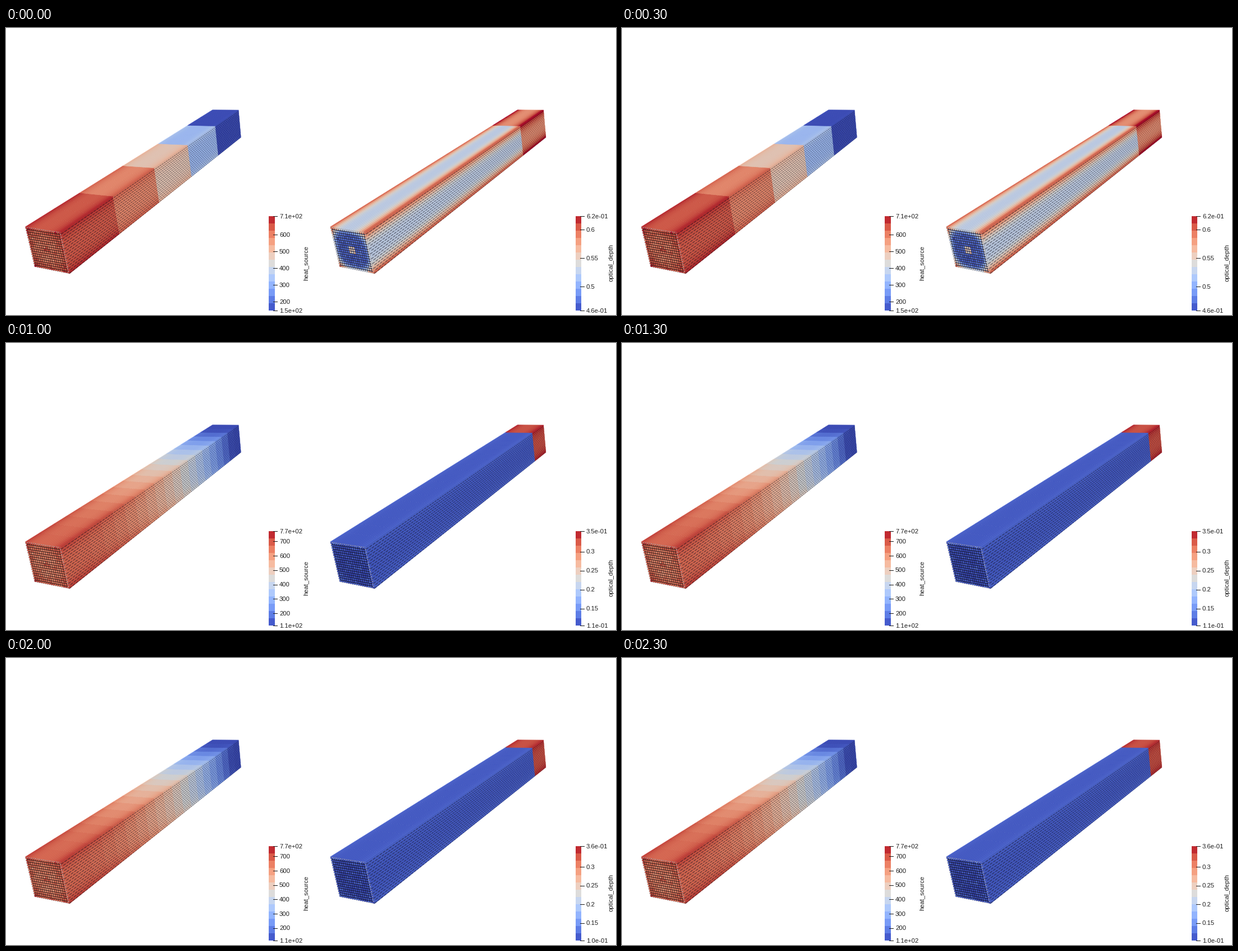
A matplotlib script for the animation above (2.5 s loop, 1089 px wide and 514 px high).

```python
import numpy as np
import matplotlib.pyplot as plt
from matplotlib.animation import FuncAnimation
from matplotlib.collections import PolyCollection

W, H, DPI = 1089, 514, 100
PINS, CELLS = 17, 20
SHIFT = 544.5
BAR_TOP, BAR_BOTTOM = 337, 506
INK = "#1c1c1c"
FONT = dict(family="Liberation Sans", fontsize=11.3 * 72 / DPI, color=INK)
CMAP = plt.get_cmap("coolwarm")

# (across, down, depth) -> stage position
ANCHORS = [
    ((0, 0, 0), (34, 356)), ((1, 0, 0), (98, 366)), ((0, 1, 0), (51, 428)),
    ((1, 1, 0), (113, 440)), ((0, 0, 1), (368, 147)), ((1, 0, 1), (415, 147)),
    ((1, 1, 1), (419, 196)), ((0, 0, .4), (209, 247)), ((1, 0, .4), (264, 251)),
    ((1, 1, .4), (273, 312)), ((0, 0, .8), (325, 174)), ((1, 0, .8), (374, 175)),
    ((1, 1, .8), (380, 228)),
]

# Per step: axial sections, heat range, heat peak, depth range, depth profile,
# depth profile of the far section, lift of the centre pins, tick values
STEPS = [
    dict(sections=5, heat=(147, 710), peak=717, depth=(.458, .6235),
         near=(.06, .09, .42, .85), far=(.76, 1.0), lift=.5,
         heat_ticks=range(200, 700, 100), depth_ticks=(.5, .55, .6)),
    dict(sections=10, heat=(110, 730), peak=730, depth=(.2206, .3517),
         near=(.03, .06, .27, .6), far=(.9, .95), lift=.38,
         heat_ticks=range(200, 700, 100),
         depth_ticks=(.24, .26, .28, .3, .32, .34)),
    dict(sections=20, heat=(114, 772), peak=742, depth=(.1054, .3538),
         near=(.02, .02, .04, .06), far=(.9, .97), lift=0,
         heat_ticks=range(200, 800, 100), depth_ticks=(.15, .2, .25, .3)),
    dict(sections=20, heat=(111, 771), peak=742, depth=(.1026, .3534),
         near=(.02, .03, .05, .07), far=(.91, .97), lift=0,
         heat_ticks=range(200, 800, 100), depth_ticks=(.15, .2, .25, .3)),
    dict(sections=20, heat=(113, 772), peak=742, depth=(.103, .356),
         near=(.02, .02, .04, .06), far=(.9, .96), lift=0,
         heat_ticks=range(200, 800, 100), depth_ticks=(.15, .2, .25, .3)),
]


def fit_camera(anchors):
    rows = []
    for point, (x, y) in anchors:
        p = np.array([*point, 1.0])
        rows.append(np.r_[p, np.zeros(4), -x / 500 * p])
        rows.append(np.r_[np.zeros(4), p, -y / 500 * p])
    camera = np.linalg.svd(np.array(rows))[2][-1].reshape(3, 4)
    camera[:2] *= 500
    return camera


CAMERA = fit_camera(ANCHORS)


def project(points):
    points = np.asarray(points, float)
    flat = np.concatenate([points, np.ones(points.shape[:-1] + (1,))], -1) @ CAMERA.T
    return flat[..., :2] / flat[..., 2:]


def face_quad(face, a0, a1, t0, t1):
    corners = [(a0, t0), (a1, t0), (a1, t1), (a0, t1)]
    if face == "top":
        return [(a, 0, t) for a, t in corners]
    return [(1, a, t) for a, t in corners]


def build_bundle():
    """Outer rod cells and front pin ends, with the sample point and light of each."""
    quads, samples, lights = [], [], []
    for face, light in (("top", .97), ("side", .9)):
        for t in range(CELLS):
            for i in range(PINS):
                mid, edge = (i + .5) / PINS, .5 / PINS
                quads.append(project(face_quad(face, i / PINS, (i + 1) / PINS,
                                               t / CELLS, (t + 1) / CELLS)))
                where = (mid, edge) if face == "top" else (1 - edge, mid)
                samples.append((*where, (t + .5) / CELLS))
                lights.append(light)
    ends = []
    angles = np.linspace(0, 2 * np.pi, 12, endpoint=False)
    for j in range(PINS):
        for i in range(PINS):
            u, v = (i + .5) / PINS, (j + .5) / PINS
            ring = [(u + .5 / PINS * np.cos(a), v + .43 / PINS * np.sin(a), 0)
                    for a in angles]
            ends.append(project(ring))
            samples.append((u, v, 0.0))
            lights.append(.95)
    return quads, ends, np.array(samples), np.array(lights)


def build_gaps():
    """Dark gaps between neighbouring rods; the side ones are broken into beads."""
    side, top = [], []
    beads = 84
    for i in range(PINS):
        for k in range(beads):
            t = (k + .5 * (i % 2)) / beads
            side.append(project(face_quad("side", (i + .68) / PINS, (i + 1) / PINS,
                                          t, min(t + .72 / beads, 1))))
        top.append(project(face_quad("top", (i + .7) / PINS, (i + 1) / PINS, 0, 1)))
    return side, top


QUADS, ENDS, SAMPLES, LIGHTS = build_bundle()
SIDE_GAPS, TOP_GAPS = build_gaps()
JITTER = np.random.default_rng(4).normal(0, .03, len(SAMPLES))
JITTER[:len(QUADS)] = 0


def heat_levels(step):
    u, v, t = SAMPLES.T
    eu, ev = abs(2 * u - 1), abs(2 * v - 1)
    n = step["sections"]
    axial = np.cos(1.5 * (np.floor(t * n + 1e-9) + .5) / n)
    radial = 1 - .08 * (2 - eu ** 3 - ev ** 3) + .07 * (np.hypot(eu, ev) < .15)
    low, high = step["heat"]
    return (step["peak"] * axial * radial - low) / (high - low) + JITTER


def depth_levels(step):
    u, v, t = SAMPLES.T
    eu, ev = abs(2 * u - 1), abs(2 * v - 1)
    d = np.cbrt(eu ** 3 + ev ** 3)
    near = np.interp(d, (0, .78, .94, 1.19), step["near"])
    near = near + step["lift"] * (d < .15)
    far = np.interp(d, (.94, 1.19), step["far"])
    last = 1 - 1 / min(step["sections"], 10)
    return np.where(t > last, far, near) + JITTER


class Panel:
    def __init__(self, ax, shift, bar_x, bar_width, title, title_x):
        self.ax, self.bar_x = ax, bar_x
        offset = np.array([shift, 0])

        def add(polys, **style):
            patch = PolyCollection([p + offset for p in polys], **style)
            ax.add_collection(patch)
            return patch

        self.rods = add(QUADS, linewidths=.35)
        add(TOP_GAPS, facecolors=(.1, .1, .12, .14), linewidths=0)
        add(SIDE_GAPS, facecolors=(.06, .06, .1, .55), linewidths=0)
        m = .5 / PINS
        back = project([(m, m, 0), (1 - m, m, 0), (1 - m, 1 - m, 0), (m, 1 - m, 0)])
        self.back = add([back], linewidths=0)
        self.ends = add(ENDS, linewidths=.3, edgecolors=(.1, .08, .1, .6))

        bands = CMAP((np.arange(13) + .5) / 13)[::-1, None, :3]
        ax.imshow(bands, extent=(bar_x, bar_x + bar_width, BAR_BOTTOM, BAR_TOP),
                  aspect="auto", interpolation="nearest")
        ax.text(title_x, 420.5, title, rotation=90, ha="center", va="center", **FONT)
        self.marks = []

    def draw(self, levels, limits, ticks):
        rgb = CMAP(np.clip(levels, 0, 1))[:, :3] * LIGHTS[:, None]
        n = len(QUADS)
        self.rods.set_facecolor(rgb[:n])
        self.rods.set_edgecolor(rgb[:n])
        self.ends.set_facecolor(rgb[n:])
        self.back.set_facecolor(rgb[n:].mean(0) * .42)

        for mark in self.marks:
            mark.remove()
        self.marks = []
        low, high = limits
        labels = [(low, f"{low:.1e}"), (high, f"{high:.1e}")]
        labels += [(value, f"{value:g}") for value in ticks]
        for value, label in labels:
            y = BAR_BOTTOM - (BAR_BOTTOM - BAR_TOP) * (value - low) / (high - low)
            self.marks += self.ax.plot([self.bar_x + 8, self.bar_x + 15], [y, y],
                                       color=INK, lw=.75)
            self.marks.append(self.ax.text(self.bar_x + 19, y + 3.6, label,
                                           va="baseline", **FONT))


fig = plt.figure(figsize=(W / DPI, H / DPI), dpi=DPI, facecolor="white")
ax = fig.add_axes([0, 0, 1, 1])
heat_panel = Panel(ax, 0, 469, 10.5, "heat_source", 535.5)
depth_panel = Panel(ax, SHIFT, 1017, 10, "optical_depth", 1080.5)
ax.set(xlim=(0, W), ylim=(H, 0), autoscale_on=False)
ax.axis("off")


def update(index):
    step = STEPS[index]
    heat_panel.draw(heat_levels(step), step["heat"], step["heat_ticks"])
    depth_panel.draw(depth_levels(step), step["depth"], step["depth_ticks"])
    return []


animation = FuncAnimation(fig, update, frames=len(STEPS), interval=500,
                          init_func=lambda: update(0), repeat=True,
                          repeat_delay=0, blit=False)
plt.show()
```
